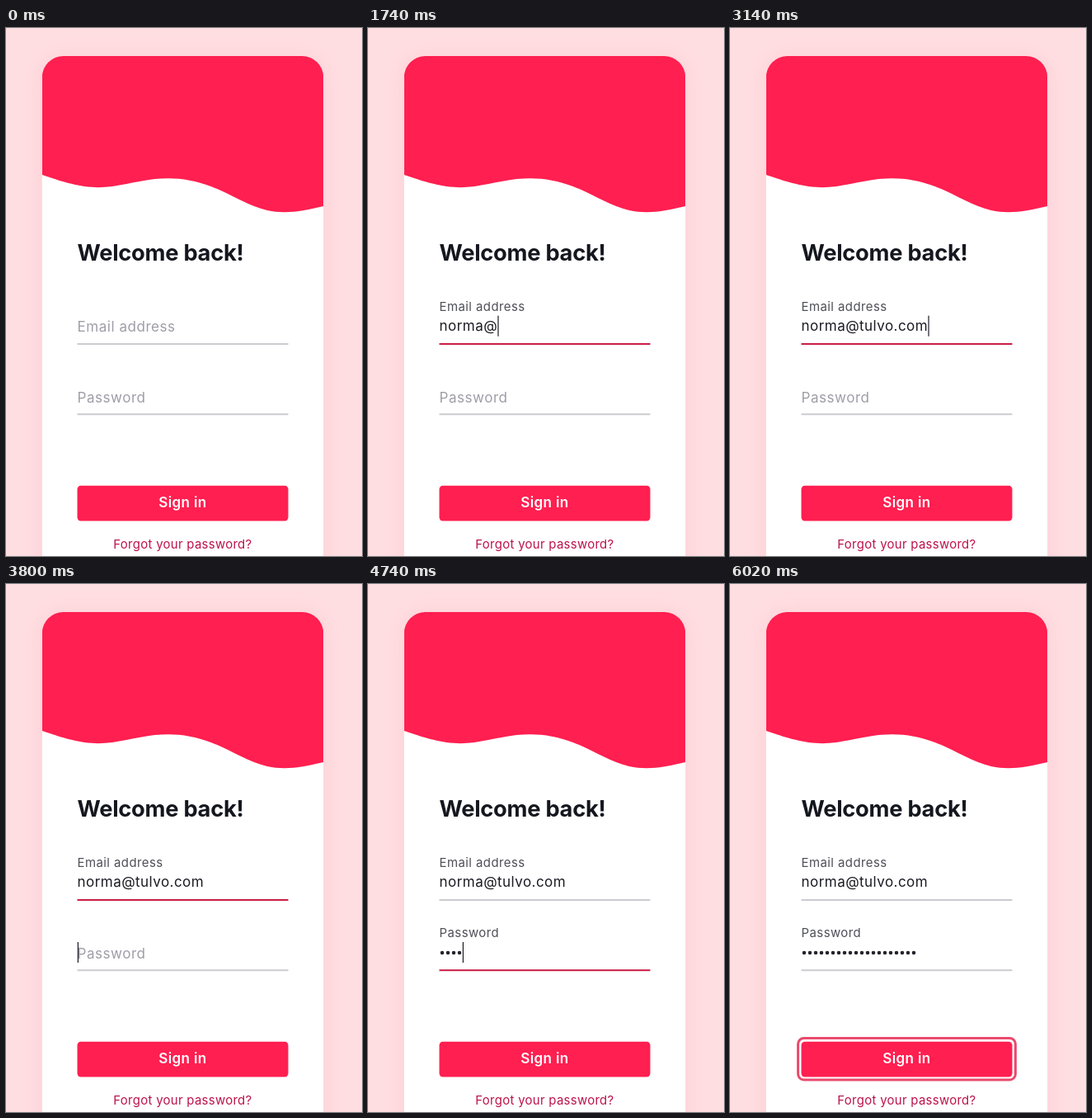
Animation, 432 px wide and 640 px high, one loop 6290 ms. Source, as an HTML page:

```html
<!DOCTYPE html>
<html lang="en">
<head>
<meta charset="utf-8">
<title>Sign in</title>
<style>
  html, body { margin: 0; width: 100%; height: 100%; overflow: hidden; background: #ffdee1; }
  svg { display: block; width: 432px; height: 640px; }
  text { font: 17.07px Inter, "Open Sans", sans-serif; letter-spacing: .03em; fill: #1b1b24; }
  .title { font-size: 27.3px; font-weight: 700; letter-spacing: -.01em; fill: #15171f; }
  .button { font-weight: 600; letter-spacing: .02em; fill: #fff; }
  .link { font-size: 14.93px; letter-spacing: .02em; fill: #bd124a; }
  #email { letter-spacing: .025em; }
  .card { filter: drop-shadow(0 2px 14px rgba(225, 60, 85, .09)); }
</style>
</head>
<body>
<svg viewBox="0 0 432 640">
  <defs>
    <clipPath id="cardShape"><rect x="43.83" y="34" width="341.33" height="680" rx="25.6"/></clipPath>
  </defs>
  <rect class="card" x="43.83" y="34" width="341.33" height="680" rx="25.6" fill="#fff"/>
  <path id="wave" clip-path="url(#cardShape)" fill="#ff1f50"/>
  <text class="title" x="86.5" y="282">Welcome back!</text>

  <rect id="emailLine" x="86.5" y="382" width="256" height="2"/>
  <text id="emailLabel">Email address</text>
  <text id="email" x="86.5" y="367.3"></text>

  <rect id="passwordLine" x="86.5" y="467.2" width="256" height="2"/>
  <text id="passwordLabel">Password</text>
  <path id="dots" fill="none" stroke="#24242c" stroke-width="4.6" stroke-linecap="round" stroke-dasharray="0 7"/>

  <rect id="caret" width="1.2" height="25" fill="#1b1b24"/>

  <rect id="ring" x="82.6" y="550.6" width="263.8" height="50.4" rx="7" fill="none" stroke="#ea4a6d" stroke-width="3"/>
  <rect x="86.5" y="554.7" width="256" height="42.7" rx="4.3" fill="#ff1f50"/>
  <text class="button" x="214.4" y="581.3" text-anchor="middle">Sign in</text>
  <text class="link" x="214.4" y="630.5" text-anchor="middle">Forgot your password?</text>
</svg>
<script>
  const LOOP = 6290, LEFT = 86.5, DOT_STEP = 7;
  const ADDRESS = "norma@tulvo.com";
  const EMAIL_FOCUS = 200, PASSWORD_FOCUS = 3800, BUTTON_FOCUS = 5880;
  const KEY_TIMES = [1130, 1270, 1330, 1460, 1610, 1740];
  for (let i = KEY_TIMES.length; i < ADDRESS.length; i++) KEY_TIMES.push(1810 + (i - 6) * 84);
  const CARET_SPANS = [[200, 870], [1130, 2810], [3140, 3470], [3800, 4470], [4670, 5610]];

  const $ = id => document.getElementById(id);
  const ease = (t, start, duration) => {
    const p = Math.min(1, Math.max(0, (t - start) / duration));
    return p * p * (3 - 2 * p);
  };
  const mix = (a, b, p) => `rgb(${a.map((v, i) => Math.round(v + (b[i] - v) * p))})`;

  // Uniform cubic B-spline through evenly spaced control heights.
  function wavePath(heights) {
    const points = heights.map((h, i) => [43.83 + i * 68.267, 178 + h * 7.585]);
    const blend = (...weighted) => [0, 1].map(axis =>
      weighted.reduce((sum, [weight, i]) => sum + weight * points[i][axis], 0).toFixed(2));
    const last = points.length - 1;
    let d = `M${points[0]}L${blend([5 / 6, 0], [1 / 6, 1])}`;
    for (let i = 1; i <= last; i++) {
      const knot = i < last
        ? blend([1 / 6, i - 1], [2 / 3, i], [1 / 6, i + 1])
        : blend([1 / 6, i - 1], [5 / 6, i]);
      d += `C${blend([2 / 3, i - 1], [1 / 3, i])} ${blend([1 / 3, i - 1], [2 / 3, i])} ${knot}`;
    }
    return `${d}L${points[last]}V34H43.83Z`;
  }

  function drawField(name, baseline, t, focus, blur) {
    const up = ease(t, focus, 250);
    const label = $(name + "Label");
    label.setAttribute("transform", `translate(${LEFT} ${baseline - 25.6 * up}) scale(${1 - .125 * up})`);
    label.style.fill = mix([158, 158, 168], [78, 78, 88], up);
    $(name + "Line").setAttribute("fill", mix([203, 204, 208], [202, 29, 70], up - ease(t, blur, 140)));
  }

  function render(t) {
    drawField("email", 368.3, t, EMAIL_FOCUS, PASSWORD_FOCUS);
    drawField("password", 453.6, t, PASSWORD_FOCUS, BUTTON_FOCUS);

    const email = $("email");
    email.textContent = ADDRESS.slice(0, KEY_TIMES.filter(k => t >= k).length);

    const dots = t < 4670 ? 0 : Math.min(20, 2 + 2 * Math.floor((t - 4670) / 66));
    $("dots").setAttribute("d", dots ? `M90 447h${(dots - 1) * DOT_STEP + .1}` : "");

    const inPassword = t >= PASSWORD_FOCUS;
    const typed = inPassword ? dots * DOT_STEP : email.getComputedTextLength();
    const caret = $("caret");
    caret.setAttribute("x", LEFT + typed + .3);
    caret.setAttribute("y", inPassword ? 434 : 348.7);
    caret.style.opacity = CARET_SPANS.some(([on, off]) => t >= on && t < off) ? 1 : 0;

    $("ring").style.opacity = ease(t, BUTTON_FOCUS, 140);
  }

  $("wave").setAttribute("d", wavePath([0, 3, 0, 1, 7, 5]));
  const start = performance.now();
  function tick() {
    render((performance.now() - start) % LOOP);
    requestAnimationFrame(tick);
  }
  tick();
</script>
</body>
</html>
```
